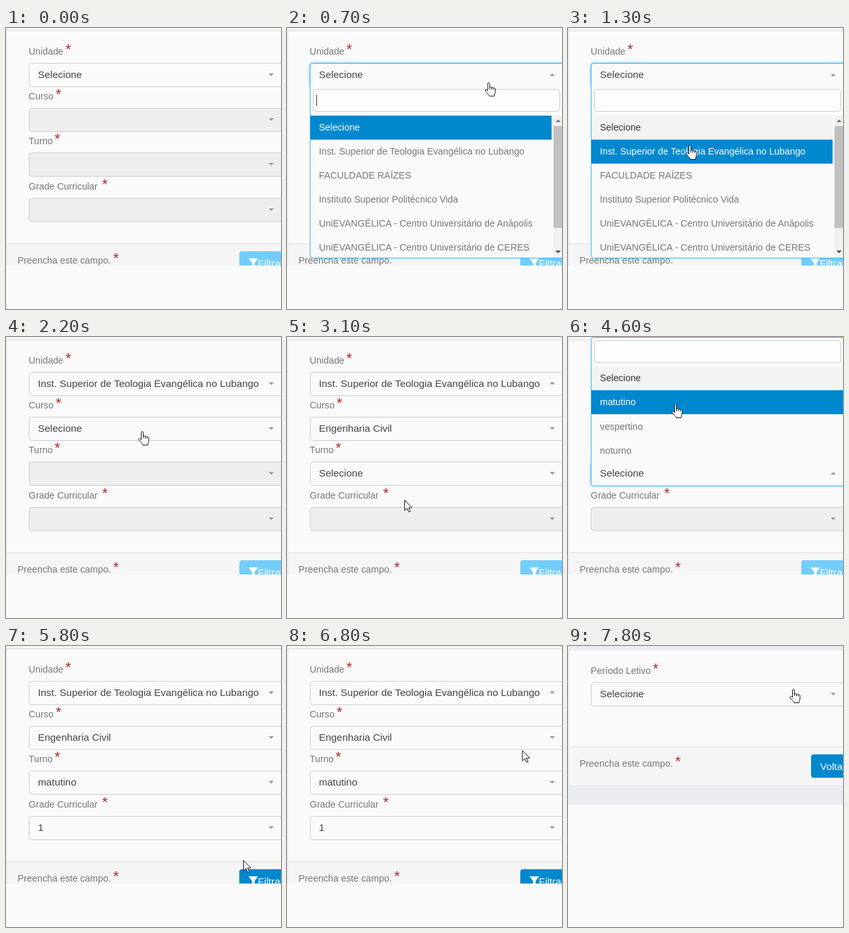
These frames come from a looping animation (422x433 px, 8000 ms). An HTML page:

```html
<!DOCTYPE html>
<html lang="pt">
<head>
<meta charset="utf-8">
<style>
  html, body { margin: 0; height: 100%; overflow: hidden; background: #fafafa; }
  svg { display: block; width: 422px; height: 433px; font: 14.3px "Liberation Sans", Arial, sans-serif; fill: #777; }
  .big { font-size: 15.38px; }
  .star { font-size: 22px; fill: #b22a2a; }
</style>
</head>
<body>
<svg id="stage" viewBox="0 0 422 433"></svg>
<script>
const LOOP = 8000, PITCH = 37.1, BLUE = '#0088cf', PICK = 'Selecione';
const SCHOOL = 'Inst. Superior de Teologia Evangélica no Lubango';
const stage = document.getElementById('stage');

const menus = [
  { from: 700, to: 1600, top: 54, scroll: true, items: [PICK, SCHOOL, 'FACULDADE RAÍZES',
    'Instituto Superior Politécnico Vida', 'UniEVANGÉLICA - Centro Universitário de Anápolis',
    'UniEVANGÉLICA - Centro Universitário de CERES'] },
  { from: 2300, to: 3000, top: 123, items: [PICK, 'Engenharia Civil', 'Teologia'] },
  { from: 3800, to: 4800, top: 192, up: true, items: [PICK, 'matutino', 'vespertino', 'noturno'] }
];

// label, star x, top, then [start time, value] pairs
const fields = [
  ['Unidade', 91.2, 54, [[0, PICK], [1600, SCHOOL]]],
  ['Curso', 76.2, 123, [[1600, PICK], [3000, 'Engenharia Civil']]],
  ['Turno', 74.6, 192, [[3100, PICK], [4800, 'matutino']]],
  ['Grade Curricular', 147.4, 262, [[5000, '1']]]
];
const term = ['Período Letivo', 130.2, 56, [[0, PICK]]];

// pointer: time, x, y
const path = [
  [100, 403, 57], [400, 329, 71], [600, 329, 71], [800, 290, 96], [1000, 240, 128],
  [1300, 187, 181], [1800, 187, 181], [2200, 209, 145], [2300, 209, 145],
  [2700, 183, 238], [2800, 181, 251], [3200, 181, 251], [3700, 174, 222], [4100, 173, 222],
  [4600, 165, 103], [4700, 165, 103], [5200, 156, 273], [5400, 156, 273],
  [5800, 365, 330], [6200, 385, 350], [6400, 385, 350], [7000, 350, 66], [7300, 350, 66],
  [7800, 346, 66], [LOOP, 346, 66]
];

const rect = (x, y, w, h, fill, more = '') =>
  `<rect x="${x}" y="${y}" width="${w}" height="${h}" fill="${fill}" ${more}/>`;
const text = (x, y, str, more = '') => `<text x="${x}" y="${y}" ${more}>${str}</text>`;
const shape = (d, fill, more = '') => `<path d="${d}" fill="${fill}" ${more}/>`;
const star = (x, y) => text(x, y, '*', 'class="star"');
const arrow = (x, y, up, fill = '#999') =>
  shape(`M${x - 4} ${y + (up ? 2 : -2)}h8l-4 ${up ? -4 : 4}z`, fill);
const choice = (top, value) => text(49, top + 23, value, 'class="big" fill="#444"');
const hint = y => text(17.8, y, 'Preencha este campo.') + star(164.4, y - 1.5);
const valueAt = (steps, t) => steps.reduce((v, [at, next]) => t >= at ? next : v, null);

function pointerAt(t) {
  const i = path.findIndex(p => p[0] > t);
  const [t0, x0, y0] = path[i - 1], [t1, x1, y1] = path[i];
  const k = (t - t0) / (t1 - t0);
  return [x0 + (x1 - x0) * k, y0 + (y1 - y0) * k];
}

function field([label, starX, top, steps], t) {
  const value = valueAt(steps, t);
  return text(34.8, top - 13, label) + star(starX, top - 14.5) +
    rect(35.5, top + .5, 400, 36, value ? '#fafafa' : '#eee', 'rx="4" stroke="#ccc"') +
    (value ? choice(top, value) : '') + arrow(407, top + 18);
}

function menu(m, t, y) {
  const first = m.up ? m.top - 146.5 : m.top + 81;
  const search = m.up ? m.top - 187 : m.top + 40;
  const y0 = m.up ? .5 : m.top + .5;
  const h = m.up ? m.top + 37 : Math.min(300, 86 + PITCH * m.items.length);
  const width = m.scroll ? 370 : 400;
  const row = Math.floor((y - first) / PITCH);
  const hover = row > 0 && row < m.items.length ? row : 0;
  let out = rect(35.5, m.top + .5, 400, 36, 'none',
      'rx="4" stroke="#5cc4f8" stroke-width="3" style="filter:drop-shadow(0 0 2px #5cc4f8)" opacity=".5"') +
    rect(35.5, y0, 400, h, '#fafafa', 'rx="4" stroke="#3ab0ee"') +
    choice(m.top, PICK) + arrow(407, m.top + 18, true) +
    rect(40.5, search + .5, 378, 34, '#fdfdfd', 'rx="4" stroke="#ccc"');
  if ((t - m.from) % 1000 < 500) out += rect(45, search + 9, 1, 17, '#333');
  m.items.forEach((item, i) => {
    const ry = first + i * PITCH;
    if (i === hover) out += rect(36, Math.floor(ry - (m.up ? .5 : 0) - .1 * i), width, 37, BLUE);
    else if (!i) out += rect(36, ry, width, 36, '#f3f3f3');
    out += text(49, ry + 22.8, item, `fill="${i === hover ? '#fff' : i ? '#777' : '#333'}"`);
  });
  if (m.scroll) out += rect(409, first, 13, 219, '#f1f1f1') + rect(409, 151, 13, 157, '#c1c1c1') +
    arrow(416, 143, true, '#777') + arrow(416, 345, false, '#444');
  return out;
}

function filterPage(t) {
  return rect(0, 0, 422, 366, '#ebecef') + rect(2, 0, 420, 366, '#fafafa') +
    rect(2, 0, 420, 4, '#f5f5f5') + rect(2, 4, 420, 1, '#ddd') +
    rect(2, 332, 420, 34, '#f5f5f5') + rect(2, 332, 420, 1, '#ddd') +
    fields.map(f => field(f, t)).join('') + hint(363) +
    rect(358, 344, 90, 37, t < 5000 ? '#74cdfb' : BLUE, 'rx="4"') +
    shape('M372 355h15l-5.5 7v7l-4-3v-4z', '#fff') +
    text(386.6, 367.5, 'Filtrar', 'class="big" fill="#fff"');
}

function termPage(t) {
  return rect(0, 0, 422, 245, '#ebecf0') + rect(2, 7, 430, 207, '#fafafa', 'rx="4"') +
    shape('M2 155H422V214H6q-4 0-4-4z', '#f5f5f5') + rect(2, 155, 420, 1, '#ddd') +
    field(term, t) + hint(186) +
    rect(373, 167, 90, 36, BLUE, 'rx="4"') +
    text(387, 191, 'Voltar', 'class="big" fill="#fff"');
}

function pointer(x, y, hand) {
  const d = hand
    ? 'M0 .5c1 0 1.5.7 1.5 1.5v6c.3-1 2.7-1 3 .5.3-.9 2.5-.7 2.8.7.5-.7 2.7-.4 2.7 1.3V15c0 2-1.5 3.5-1.5 6.5H1c0-2-5.5-6-6.5-9 .2-1.3 2-1.5 4 .8V2c0-.8.5-1.5 1.5-1.5z' +
      'M1.5 8v3M4.5 8.5v3M7.3 9.2v2.5'
    : 'M-.5.5v16l3.8-3.6 2.6 5.8 2.4-1-2.6-5.7h5.1z';
  return shape(d, '#fff', `stroke="#111" stroke-linejoin="round" transform="translate(${x} ${y})"`);
}

function scene(t) {
  const last = t >= 7400;
  const open = menus.find(m => t >= m.from && t < m.to);
  let out = last ? termPage(t) : filterPage(t);
  if (t >= path[0][0]) {
    const [x, y] = pointerAt(t);
    const overField = (last ? [term] : fields).some(f => valueAt(f[3], t) && y >= f[2] && y < f[2] + 37);
    if (open) out += menu(open, t, y);
    out += pointer(x, y, open || overField || (x > 358 && y > 344));
  }
  return '<clipPath id="view"><path d="M0 0H422V366H0z"/></clipPath><g clip-path="url(#view)">' + out + '</g>';
}

let shown = -1;
function tick(now) {
  const t = Math.floor(now % LOOP / 100) * 100;
  if (t !== shown) stage.innerHTML = scene(shown = t);
  requestAnimationFrame(tick);
}
tick(performance.now());
</script>
</body>
</html>
```
